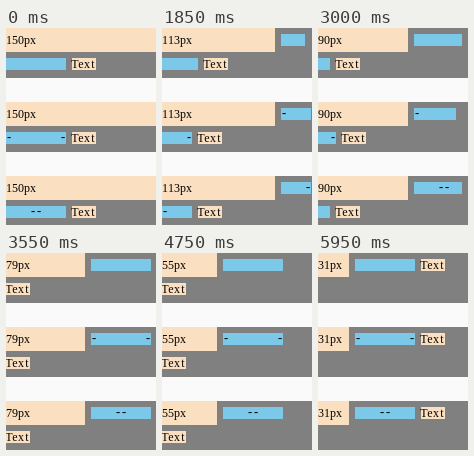
Recreate the animation shown at these times as an HTML page with a canvas. Size 150 by 197 pixels, loop 6 s.

```html
<!DOCTYPE html>
<html lang="en">
<head>
<meta charset="utf-8">
<title>Inline wrapping</title>
<style>
  html, body { margin: 0; width: 100%; height: 100%; overflow: hidden; background: #fafafa; }
  canvas { display: block; }
</style>
</head>
<body>
<canvas id="stage" width="150" height="197"></canvas>
<script>
const ctx = document.getElementById('stage').getContext('2d');
const W = 150, H = 197, CELL = 6, LINE = 24;
const STEP = 50, LOOP = 6000;
const GRAY = '#808080', TAN = '#fae0c0', BLUE = '#7bc8e8', PAGE = '#fafafa';
const SERIF = '12px "Liberation Serif", "Times New Roman", serif';
const MONO = '12px "Liberation Mono", "Courier New", monospace';

// Unbreakable pieces of each bar; "_" is a space two cells wide.
const BARS = [
  ['_', '_', '_', '_', '_'],
  ['-', '_', '_', '_', '_-'],
  ['_', '_-', '-', '_', '_']
];

const advance = ch => ch === '_' ? 2 * CELL : CELL;
const measure = text => [...text].reduce((sum, ch) => sum + advance(ch), 0);

function rect(x, y, w, h, color) {
  ctx.fillStyle = color;
  ctx.fillRect(x, y, w, h);
}

// Text on a fixed grid of cells; y is the top of the 12px row.
function write(text, x, y) {
  ctx.fillStyle = '#000';
  ctx.textAlign = 'center';
  ctx.textBaseline = 'alphabetic';
  for (const ch of text) {
    if (ch !== '_') {
      ctx.font = ch === '-' ? MONO : SERIF;
      ctx.fillText(ch, x + CELL / 2, y + (ch === '-' ? 9 : 10));
    }
    x += advance(ch);
  }
}

function box(text, x, y, color) {
  rect(x, y, measure(text), 12, color);
  write(text, x, y);
}

function panel(top, width, pieces) {
  rect(0, top, W, 50, GRAY);
  rect(0, top, width, LINE, TAN);
  write(width + 'px', 0, top + 6);

  let x = width + CELL, line = 0;
  const place = (text, color) => {
    const size = measure(text);
    if (x + size > W) {
      x = 0;
      line++;
    }
    box(text, x, top + line * LINE + 6, color);
    x += size;
  };
  pieces.forEach(piece => place(piece, BLUE));
  x += CELL;
  place('Text', TAN);
}

function draw(time) {
  const width = W - Math.floor((time % LOOP) / STEP);
  rect(0, 0, W, H, PAGE);
  BARS.forEach((pieces, i) => panel(i * 74, width, pieces));
}

let start = null;
function tick(now) {
  if (start === null) start = now;
  draw(Math.max(0, now - start));
  requestAnimationFrame(tick);
}
draw(0);
requestAnimationFrame(tick);
</script>
</body>
</html>
```
